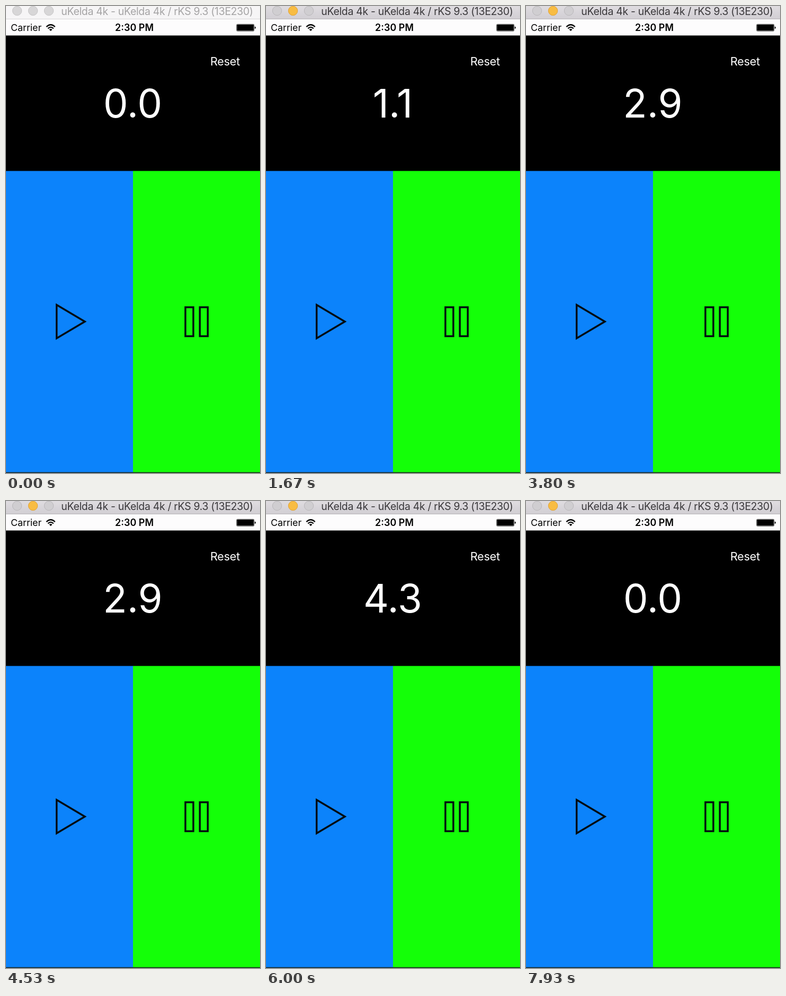
Write an HTML page that moves like this. It is 480x879 px and loops after 8 s.

```html
<!DOCTYPE html>
<html lang="en">
<head>
<meta charset="utf-8">
<title>Stopwatch</title>
<style>
  html, body { margin: 0; width: 100%; height: 100%; overflow: hidden; background: #000; }
  svg { display: block; width: 100%; height: 100%; font-family: Inter, Roboto, sans-serif; }
  .title { font-size: 19.5px; letter-spacing: -.34px; }
  .status { font-size: 17.8px; }
  .time { font-size: 18px; font-weight: 600; }
  .reset { font-size: 21.7px; letter-spacing: -.3px; }
  .count { font-size: 74.5px; font-weight: 400; }
  .icon { fill: none; stroke: #040c10; stroke-width: 3.5; }
</style>
</head>
<body>
<svg viewBox="0 0 480 879" preserveAspectRatio="none">
  <defs>
    <linearGradient id="bar" x1="0" y1="0" x2="0" y2="1">
      <stop offset="0" stop-color="#dfdce0"/>
      <stop offset="1" stop-color="#d0cdd2"/>
    </linearGradient>
  </defs>

  <rect id="chrome" width="480" height="26"/>
  <path id="edge" d="M0 24.5H480" stroke-width="1"/>
  <g id="lights" stroke-width="1">
    <circle cx="21" cy="9" r="8.7"/>
    <circle cx="51" cy="9" r="8.7"/>
    <circle cx="81" cy="9" r="8.7"/>
  </g>
  <text id="title" class="title" x="285.5" y="17" text-anchor="middle">uKelda 4k - uKelda 4k / rKS 9.3 (13E230)</text>

  <rect y="25" width="480" height="31" fill="#fdfcfd"/>
  <text class="status" x="9" y="47">Carrier</text>
  <g fill="none" stroke="#000" stroke-width="2.3">
    <path d="M76.3 39.2Q84.5 31.2 92.7 39.2"/>
    <path d="M79.3 42.4Q84.5 37.4 89.7 42.4"/>
  </g>
  <path d="M81.6 44.3Q84.5 41.8 87.4 44.3L84.5 47.3Z"/>
  <text class="time" x="242.5" y="47" text-anchor="middle">2:30 PM</text>
  <rect x="435.6" y="34.2" width="33.4" height="13.2" rx="2" fill="none" stroke="#666" stroke-width="1"/>
  <rect x="436.4" y="35" width="31.8" height="11.6" rx="1.2"/>
  <path d="M470 38.5q2 .5 2 2.2t-2 2.2z"/>

  <rect y="55.5" width="480" height="323.5"/>
  <text class="reset" x="414" y="111.7" text-anchor="middle" fill="#fff">Reset</text>
  <text id="count" class="count" x="239.5" y="210" text-anchor="middle" fill="#fff"></text>

  <rect y="310.5" width="240" height="568" fill="#0c83fb"/>
  <rect x="240" y="310.5" width="240" height="568" fill="#14ff08"/>
  <rect y="877.5" width="480" height="1.5" fill="#1c2a24"/>
  <path class="icon" d="M95.7 562.6L149 594L95.7 625.4Z"/>
  <path class="icon" d="M339 567h15v54.4h-15zM366.3 567h15v54.4h-15z"/>
</svg>

<script>
const LOOP = 8000;
const FOCUS = 470;                      // window becomes active
const START = 550, PAUSE = 3490;        // first run
const RESUME = 4515, RESET = 7300;      // second run

const $ = id => document.getElementById(id);
const chrome = $('chrome'), edge = $('edge'), title = $('title'), count = $('count');
const lights = [...$('lights').children];
const clamp = (v, lo, hi) => Math.min(hi, Math.max(lo, v));
const ticks = (t, from, to) => Math.floor((clamp(t, from, to) - from) / 100);

function paint(el, fill, stroke) {
  el.setAttribute('fill', fill);
  el.setAttribute('stroke', stroke);
}

function draw(t) {
  const active = t >= FOCUS;
  paint(chrome, active ? 'url(#bar)' : '#f6f5f6', 'none');
  paint(edge, 'none', active ? '#b5b2b6' : '#d6d5d6');
  paint(title, active ? '#3a383b' : '#a5a4a5', 'none');
  lights.forEach((el, i) => {
    if (active && i === 1) paint(el, '#f8bc42', '#dfa238');
    else paint(el, active ? '#d0ced1' : '#d7d6d7', active ? '#b9b7ba' : '#c6c5c6');
  });

  const n = t >= RESET ? 0 : ticks(t, START, PAUSE) + ticks(t, RESUME, RESET);
  count.textContent = (n / 10).toFixed(1);
}

const begin = performance.now();
function frame() {
  draw((performance.now() - begin) % LOOP);
  requestAnimationFrame(frame);
}
draw(0);
requestAnimationFrame(frame);
</script>
</body>
</html>
```
